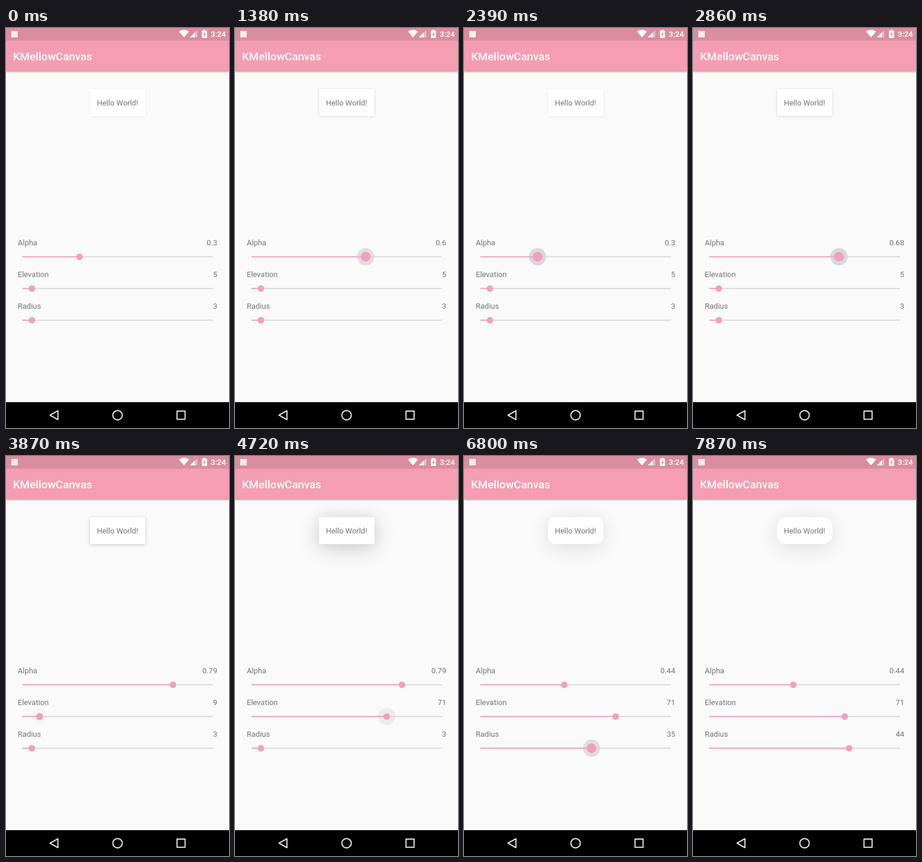
Animation, 379 px wide and 681 px high, one loop 8.56 s. Source, as an HTML page:

```html
<!DOCTYPE html>
<html lang="en">
<head>
<meta charset="utf-8">
<title>Shadow settings</title>
<style>
  html, body { margin: 0; width: 100%; height: 100%; overflow: hidden; background: #fafafa; }
  body { position: relative; }
  svg { position: absolute; left: 0; top: 0; display: block; }
  text { font-family: Roboto, sans-serif; font-size: 13px; fill: #757575; }
  .light { fill: #fff; font-weight: 500; }
  .title { font-size: 18.8px; }
  .bar { position: absolute; left: 0; top: 0; width: 379px; height: 73px; background: #f49db3;
         box-shadow: 0 1.5px 3px rgba(0,0,0,.38); }
  .card { position: absolute; left: 142.5px; top: 103.5px; width: 94px; height: 46.7px; background: #fff; }
</style>
</head>
<body>
<div class="bar"></div>
<div class="card" id="card"></div>
<svg width="379" height="681" viewBox="0 0 379 681">
  <rect width="379" height="21.5" fill="#d98d9f"/>
  <rect x="9" y="5" width="11" height="11" fill="#f8eaed"/>
  <g fill="#fff">
    <path d="M302.5 16 L294 6 Q302.5 0 311 6 Z"/>
    <path d="M325 3.5 V16 H312.5 Z" opacity=".4"/>
    <path d="M321 7.5 V16 H312.5 Z"/>
    <path d="M335.5 4.5 V3 H339 V4.5 H341.5 V17 H333 V4.5 Z"/>
  </g>
  <path d="M338 6.5 L335 11.5 H336.8 V15 L339.8 10 H338 Z" fill="#d98d9f"/>
  <text class="light" x="348" y="15">3:24</text>
  <text class="light title" x="12" y="54.5">KMellowCanvas</text>
  <text x="189.5" y="132" text-anchor="middle">Hello World!</text>
  <g id="rows"></g>
  <rect y="637" width="379" height="44" fill="#000"/>
  <g fill="none" stroke="#eee" stroke-width="1.9" stroke-linejoin="round">
    <path d="M74.8 659.2 L88.3 651.6 V666.8 Z"/>
    <circle cx="189.6" cy="659.2" r="8"/>
    <rect x="290.6" y="652.3" width="13.8" height="13.8"/>
  </g>
</svg>
<script>
const LOOP = 8560, STEP = 76, LEFT = 27.8, WIDTH = 324, PINK = '#f19fc1';

const rows = [
  { name: 'Alpha', max: 100, start: 30, text: v => String(v / 100) },
  { name: 'Elevation', max: 100, start: 5, text: String },
  { name: 'Radius', max: 60, start: 3, text: String }
];

const drags = [
  { row: 0, from: 1080, to: 1690, end: 74 },
  { row: 0, from: 1860, to: 1860, end: 78 },
  { row: 0, from: 2010, to: 2390, end: 30 },
  { row: 0, from: 2560, to: 3090, end: 79 },
  { row: 1, from: 3870, to: 4560, end: 71 },
  { row: 0, from: 5100, to: 5470, end: 44 },
  { row: 2, from: 6340, to: 7100, end: 44 }
];

// Finger down, finger up, ripple gone
const touches = [
  { row: 0, down: 1080, up: 2950, gone: 3250 },
  { row: 1, down: 3870, up: 4450, gone: 5100 },
  { row: 0, down: 5100, up: 5560, gone: 6020 },
  { row: 2, down: 6340, up: 7410, gone: 7870 }
];

const clamp = x => Math.min(1, Math.max(0, x));

// Quick start, soft landing
function ease(x) {
  const k = x ** 0.8;
  return k * k * (3 - 2 * k);
}

function add(tag, attrs, text = '') {
  const el = document.createElementNS('http://www.w3.org/2000/svg', tag);
  set(el, attrs);
  el.textContent = text;
  return document.getElementById('rows').appendChild(el);
}

function set(el, attrs) {
  for (const k in attrs) el.setAttribute(k, attrs[k]);
}

rows.forEach((r, i) => {
  const y = 389.5 + 54 * i;
  const track = { x: LEFT, y: y - 0.9, width: WIDTH, height: 1.8 };
  add('text', { x: 20, y: y - 19.5 }, r.name);
  r.label = add('text', { x: 359, y: y - 19.5, 'text-anchor': 'end' });
  r.ripple = add('circle', { cy: y, fill: '#000' });
  add('rect', { ...track, fill: '#d6d6d6' });
  r.fill = add('rect', { ...track, fill: PINK });
  r.thumb = add('circle', { cy: y, fill: PINK });
});

// Row value, moving in whole steps
function valueAt(row, t) {
  let value = rows[row].start;
  for (const d of drags) {
    if (d.row !== row || t < d.from) continue;
    const count = Math.round((d.to - d.from) / STEP) + 1;
    const gap = (d.to - d.from) / Math.max(1, count - 1);
    const done = Math.min(count, gap ? Math.floor((t - d.from + 5) / gap) + 1 : 1);
    value = Math.round(value + (d.end - value) * ease(done / count));
  }
  return value;
}

// Thumb growth and ripple
function pressAt(row, t) {
  const touch = touches.find(p => p.row === row && t >= p.down && t < p.gone);
  if (!touch) return { grow: 0, shade: 0, size: 0 };
  const age = Math.floor((t - touch.down + 5) / STEP) * STEP;
  const since = touch.down + age - touch.up;
  if (since < 0) {
    const grow = clamp((age + 30) / 150);
    return { grow, shade: Math.min(0.13, 0.1 * grow + age / 40000), size: 12.5 + 2.2 * grow };
  }
  const grow = clamp(1 - since / 150);
  return { grow, shade: 0.055 + 0.065 * grow, size: 14.7 };
}

function draw(t) {
  const values = rows.map((r, i) => valueAt(i, t));

  rows.forEach((r, i) => {
    const length = WIDTH * values[i] / r.max, cx = LEFT + length;
    const p = pressAt(i, t);
    r.label.textContent = r.text(values[i]);
    set(r.fill, { width: length });
    set(r.thumb, { cx, r: 5.5 + 2.8 * p.grow });
    set(r.ripple, { cx, r: p.size, 'fill-opacity': p.shade });
  });

  const [alpha, lift, radius] = values;
  const dark = k => `rgba(0,0,0,${alpha / 100 * k})`;
  const style = document.getElementById('card').style;
  style.borderRadius = `${radius * 0.351 + 0.7}px`;
  style.boxShadow = `0 ${0.3 + lift * 0.1}px ${2 + lift * 0.5}px ${dark(0.22)}, ` +
    `0 0 ${1 + lift * 0.28}px ${dark(0.08)}`;
}

const begin = performance.now();
function frame() {
  draw((performance.now() - begin) % LOOP);
  requestAnimationFrame(frame);
}
frame();
</script>
</body>
</html>
```
